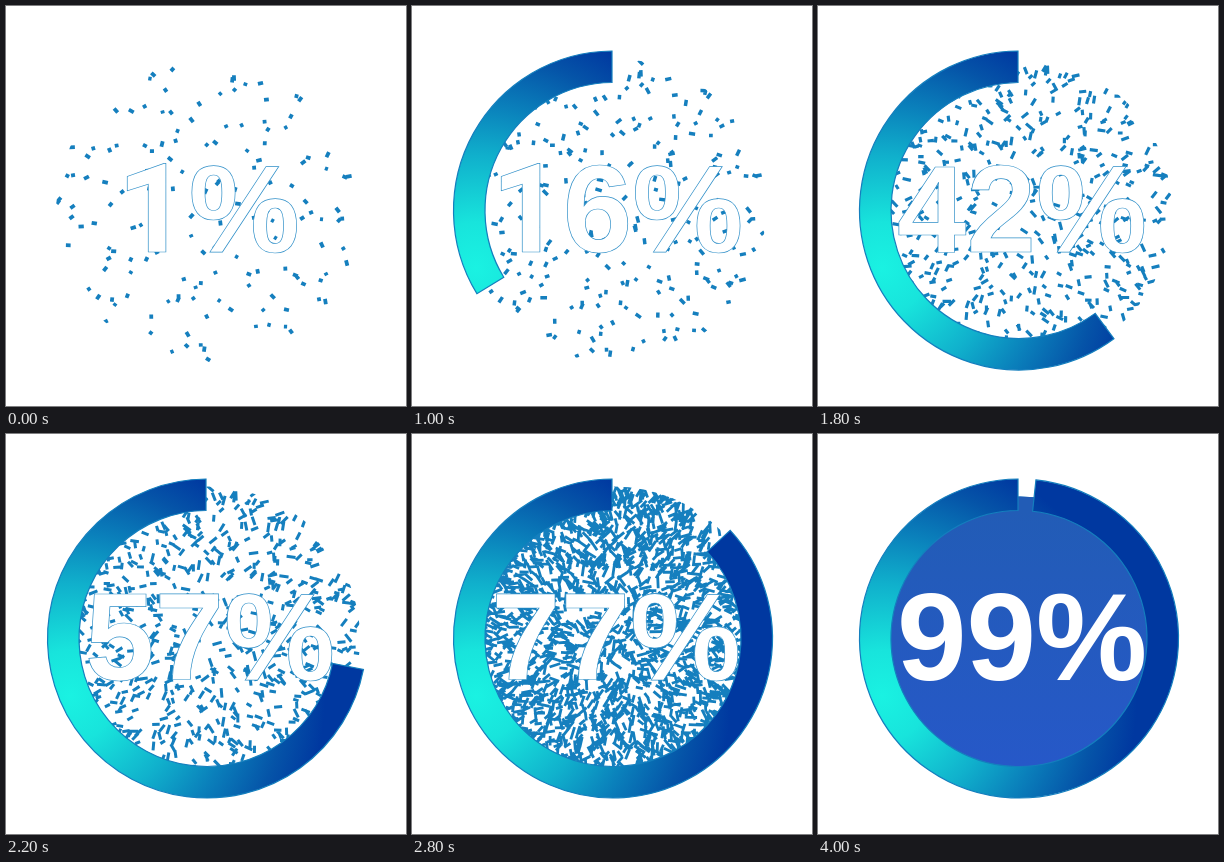
Recreate the animation shown at these times as an HTML page with a canvas. Size 400 by 400 pixels, loop 6.1 s.

```html
<!DOCTYPE html>
<html lang="en">
<head>
<meta charset="utf-8">
<title>Percent loader</title>
<style>
  html, body { margin: 0; width: 100%; height: 100%; overflow: hidden; background: #fff; }
  canvas, svg { position: absolute; left: 0; top: 0; width: 400px; height: 400px; }
  text { font: bold 125px "Liberation Sans", Arial, sans-serif; fill: #fff; stroke: #2f8fc8; stroke-width: .7px; }
  .one { font-family: Roboto, sans-serif; }
</style>
</head>
<body>
<canvas id="dust" width="400" height="400"></canvas>
<svg viewBox="0 0 400 400">
  <defs>
    <radialGradient id="sea" gradientUnits="userSpaceOnUse" cx="64" cy="262" r="255">
      <stop offset="0" stop-color="#1af2e2"/>
      <stop offset="0.18" stop-color="#18e4dc"/>
      <stop offset="0.44" stop-color="#10b0cc"/>
      <stop offset="0.64" stop-color="#0a80bb"/>
      <stop offset="0.84" stop-color="#0554a8"/>
      <stop offset="1" stop-color="#0038a0"/>
    </radialGradient>
  </defs>
  <path id="ring" fill="url(#sea)" stroke="#147fbe" stroke-width="1.2"/>
  <text id="label" y="246"></text>
</svg>
<script>
const LOOP = 6100, STEP = 100, LAST = 40;
const CX = 201, CY = 204.5, OUTER = 159.5, INNER = 128;
const BLUE = '#157fbe';

// One row per key step; values between rows are interpolated.
const steps  = [0, 6, 14, 22, 28, 32, 40];
const angle  = [0, 70.9, 171, 258.8, 312.7, 338.7, 353.9];
const count  = [1, 6, 28, 57, 77, 88, 99];
const amount = [150, 190, 310, 720, 2200, 4300, 5200];
const length = [4.4, 4.8, 5.6, 7.5, 10, 13, 18];
const width  = [3.8, 3.7, 3.3, 3, 2.8, 4, 6];
const reach  = [152, 152, 152, 152, 152, 152, 142];

const segment = s => {
  let k = 0;
  while (k < steps.length - 2 && s >= steps[k + 1]) k++;
  return k;
};

function linear(values, s) {
  const k = segment(s), u = (s - steps[k]) / (steps[k + 1] - steps[k]);
  return values[k] + (values[k + 1] - values[k]) * u;
}

function smooth(values, s) {
  const end = steps.length - 1;
  const slope = k => {
    if (k === end) return 0;
    const a = Math.max(k - 1, 0);
    return (values[k + 1] - values[a]) / (steps[k + 1] - steps[a]);
  };
  const k = segment(s), span = steps[k + 1] - steps[k], u = (s - steps[k]) / span;
  const ease = u * u * (3 - 2 * u);
  return values[k] + (values[k + 1] - values[k]) * ease
    + span * u * (1 - u) * ((1 - u) * slope(k) - u * slope(k + 1));
}

let seed = 20117;
function random() {
  seed = (Math.imul(seed, 1664525) + 1013904223) >>> 0;
  return seed / 4294967296;
}

// Evenly spread over the disc, then loosened by chance.
const specks = Array.from({ length: 5200 }, (_, i) => ({
  turn: (i * 0.56984 + random() * 0.09) * Math.PI * 2,
  area: i * 0.75488 + random() * 0.14,
  tilt: (random() - 0.5) * 2,
  size: 0.7 + random() * 0.6
}));

const ctx = document.getElementById('dust').getContext('2d');
const ring = document.getElementById('ring');
const label = document.getElementById('label');

function drawDust(s) {
  const total = linear(amount, s), len = linear(length, s), thick = linear(width, s);
  ctx.clearRect(0, 0, 400, 400);
  ctx.save();
  ctx.beginPath();
  ctx.arc(CX + 1, CY, linear(reach, s), 0, Math.PI * 2);
  ctx.clip();
  ctx.strokeStyle = BLUE;
  ctx.lineWidth = thick;
  ctx.beginPath();
  for (let i = 0; i < total; i++) {
    const p = specks[i];
    const r = 151 * Math.pow((p.area + s * 0.006) % 1, 0.47);
    const x = CX + 1 + r * Math.cos(p.turn), y = CY + r * Math.sin(p.turn);
    const half = len * p.size / 2, dir = p.turn + p.tilt;
    const dx = half * Math.cos(dir), dy = half * Math.sin(dir);
    ctx.moveTo(x - dx, y - dy);
    ctx.lineTo(x + dx, y + dy);
  }
  ctx.stroke();
  if (s > 32) {
    const fill = ctx.createLinearGradient(0, 77, 0, 332);
    fill.addColorStop(0, '#225cb6');
    fill.addColorStop(1, '#2658c8');
    ctx.globalAlpha = (s - 32) / (LAST - 32);
    ctx.fillStyle = fill;
    ctx.fillRect(0, 0, 400, 400);
  }
  ctx.restore();
}

function ringPath(degrees) {
  if (degrees <= 0) return '';
  const a = degrees * Math.PI / 180, large = degrees > 180 ? 1 : 0;
  const at = r => `${CX - r * Math.sin(a)} ${CY - r * Math.cos(a)}`;
  return `M200 ${CY - OUTER}A${OUTER} ${OUTER} 0 ${large} 0 ${at(OUTER)}`
    + `L${at(INNER)}A${INNER} ${INNER} 0 ${large} 1 200 ${CY - INNER}Z`;
}

function draw(s) {
  drawDust(s);
  ring.setAttribute('d', ringPath(smooth(angle, s)));
  // The plain figure one has no foot, so it takes the other face.
  label.innerHTML = `${Math.round(smooth(count, s))}%`.replace(/1/g, '<tspan class="one">1</tspan>');
  label.setAttribute('x', s === 0 ? 111 : 79);
  label.style.strokeOpacity = Math.min(1, (LAST - s) / 8);
}

let shown = -1;
function tick() {
  const s = Math.min(LAST, Math.floor(performance.now() % LOOP / STEP));
  if (s !== shown) draw(shown = s);
  requestAnimationFrame(tick);
}
tick();
</script>
</body>
</html>
```
